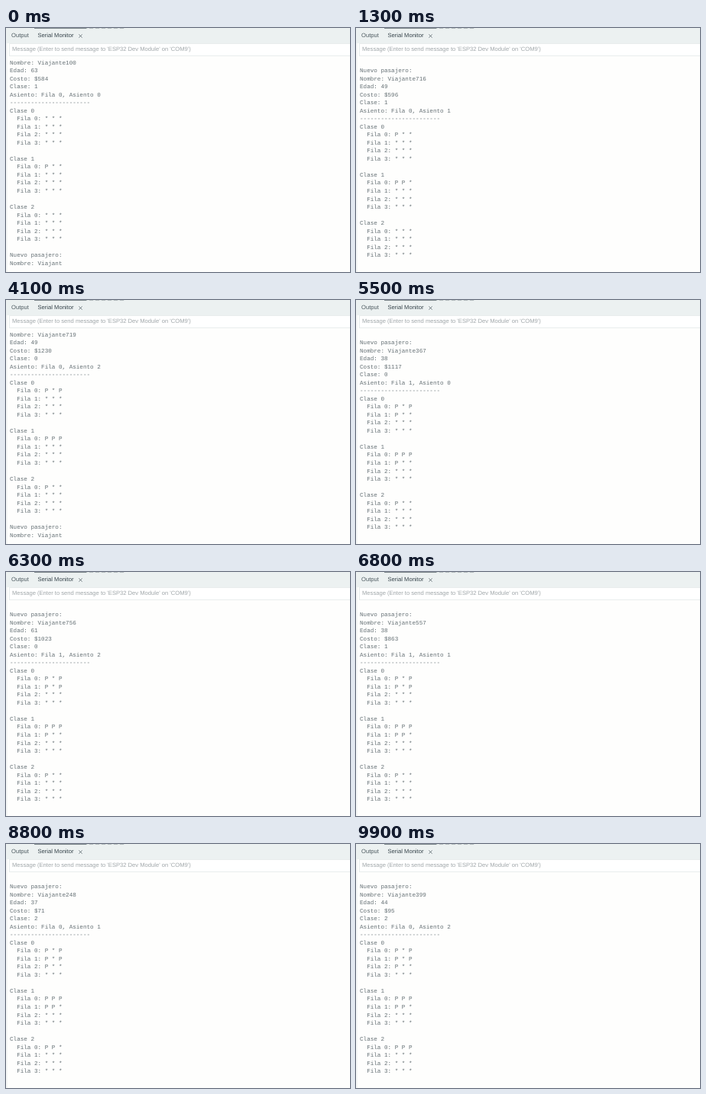
An HTML page for the animation above (10 s loop, 450 by 320 pixels).

```html
<!DOCTYPE html>
<html lang="es">
<head>
<meta charset="utf-8">
<title>Serial Monitor</title>
<style>
  html, body { margin: 0; width: 100%; height: 100%; overflow: hidden; }
  body {
    position: relative;
    background: #fefefd;
    color: #4e5b61;
    font: 7.62px/10px "Liberation Sans", Arial, sans-serif;
    text-rendering: geometricPrecision;
  }
  body > * { position: absolute; white-space: pre; }
  .bar { left: 0; top: 0; width: 100%; height: 20px; background: #ecf1f1; }
  .edge { left: 0; top: 20px; width: 2px; bottom: 0; background: #f4f6f6; }
  .cut {
    left: 37px; top: 0; width: 118px; height: 1px;
    background:
      linear-gradient(90deg, #7d888c 68px, transparent 0),
      repeating-linear-gradient(90deg, #b4bcbe 0 5px, #dfe5e5 5px 8px);
  }
  .tab { top: 5.3px; }
  .active { color: #35434a; }
  .close { left: 94.6px; top: 8.2px; width: 5px; height: 5px; stroke: #4e5b61; stroke-width: .8; }
  .input {
    left: 4px; top: 20px; right: 0; height: 17px; box-sizing: border-box;
    padding: 2px 0 0 3px; border: 1px solid #e8eded; border-right: 0;
    background: #fff; color: #a0a7aa;
  }
  #log {
    left: 5px; top: 41.5px; margin: 0; color: #657075;
    font: 7.62px/10.53px "Liberation Mono", "Courier New", monospace;
  }
</style>
</head>
<body>
<div class="bar"></div>
<div class="edge"></div>
<div class="cut"></div>
<div class="tab" style="left:7px">Output</div>
<div class="tab active" style="left:41.5px">Serial Monitor</div>
<svg class="close" viewBox="0 0 5 5"><path d="M.4 .4 4.6 4.6M4.6 .4 .4 4.6"/></svg>
<div class="input">Message (Enter to send message to 'ESP32 Dev Module' on 'COM9')</div>
<pre id="log"></pre>
<script>
const LOOP = 10000, FRAME = 100, STEP = 8.2;
const NAME = "Viajante";
const CLASSES = "1012101001022";

let seed = 7;
function rand(min, max) {
  seed = (seed * 16807) % 2147483647;
  return min + Math.floor(seed / 2147483647 * (max - min));
}

// Class 0 leaves the middle seat free; the others fill each row.
function seatOf(cls, n) {
  return cls === 0 ? [n >> 1, n % 2 * 2] : [Math.floor(n / 3), n % 3];
}

function costOf(cls) {
  return [rand(1000, 1400), rand(500, 900), rand(50, 100)][cls];
}

const seats = [0, 1, 2].map(() => Array.from({ length: 4 }, () => ["*", "*", "*"]));

function seatMap() {
  return seats.map((rows, c) =>
    [`Clase ${c}`, ...rows.map((row, r) => `  Fila ${r}: ${row.join(" ")}`)].join("\n")
  ).join("\n\n");
}

const boarded = [0, 0, 0];
const reports = Array.from(CLASSES, Number).map(cls => {
  const [row, seat] = seatOf(cls, boarded[cls]++);
  seats[cls][row][seat] = "P";
  return `Nombre: ${NAME}${rand(100, 1000)}
Edad: ${rand(17, 68)}
Costo: $${costOf(cls)}
Clase: ${cls}
Asiento: Fila ${row}, Asiento ${seat}
${"-".repeat(23)}
${seatMap()}
`;
});

const heading = "Nuevo pasajero:\n";
const log = document.getElementById("log");
let shown;

// Each new report halts briefly mid-name, then the rest arrives at once.
function screenAt(t) {
  const tick = Math.floor(t / FRAME);
  const i = Math.min(Math.floor((tick + 0.5) / STEP), reports.length - 2);
  return tick === Math.round(i * STEP)
    ? reports[i] + "\n" + heading + "Nombre: " + NAME.slice(0, 7)
    : "\n" + heading + reports[i + 1];
}

function draw() {
  const text = screenAt(performance.now() % LOOP);
  if (text !== shown) log.textContent = shown = text;
  requestAnimationFrame(draw);
}
draw();
</script>
</body>
</html>
```
